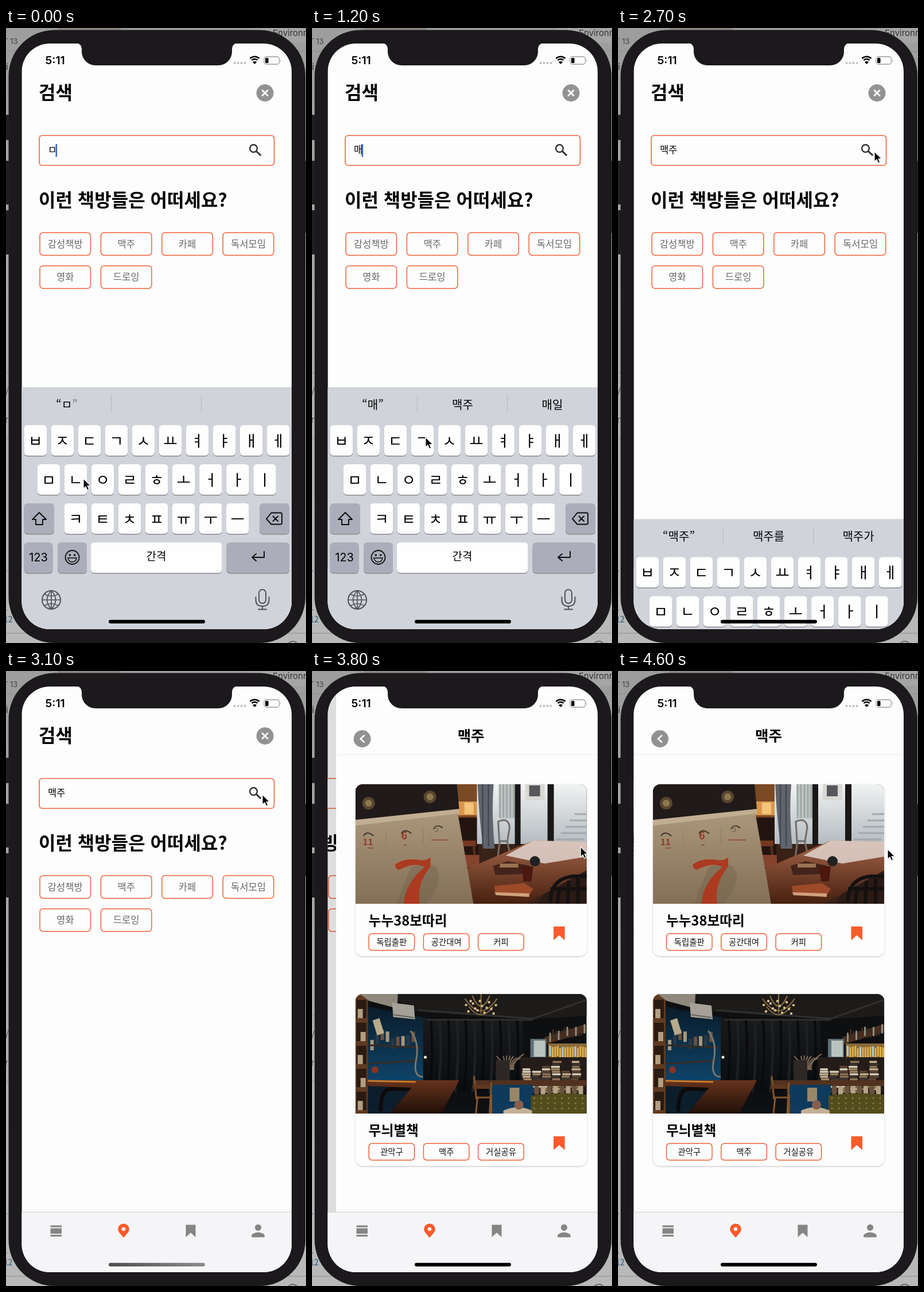
Animation, 523 px wide and 1070 px high, one loop 4700 ms. Source, as an HTML page:

```html
<!DOCTYPE html>
<html lang="ko">
<head>
<meta charset="utf-8">
<style>
html, body { margin: 0; width: 100%; height: 100%; overflow: hidden; background: #bdbdbd; }
svg { display: block; }
#stage { width: 100vw; height: 100vh; }
text { font-family: "Noto Sans CJK KR", "Noto Sans CJK", "Noto Sans KR", sans-serif; white-space: pre; }
.latin { font-family: Inter, Roboto, sans-serif; }
</style>
</head>
<body>
<svg id="stage" viewBox="0 0 523 1070" preserveAspectRatio="none"></svg>
<script>
const LOOP = 4700, STEP = 100;
const ORANGE = '#ee6337', HOT = '#fb5a2b', GREY = '#858585', INK = '#0b0b0c';

let seed = 11;
const rnd = () => (seed = seed * 16807 % 2147483647) / 2147483647;
const times = (n, fn) => Array.from({ length: n }, (_, i) => fn(i)).join('');

const rect = (x, y, w, h, fill, extra = '') =>
  `<rect x="${x}" y="${y}" width="${w}" height="${h}" fill="${fill}" ${extra}/>`;
const path = (d, fill, extra = '') => `<path d="${d}" fill="${fill}" ${extra}/>`;
const line = (d, stroke, width, extra = '') =>
  path(d, 'none', `stroke="${stroke}" stroke-width="${width}" ${extra}`);
const disc = (x, y, r, fill, extra = '') => `<circle cx="${x}" cy="${y}" r="${r}" fill="${fill}" ${extra}/>`;
const text = (s, x, y, size, extra = '') => `<text x="${x}" y="${y}" font-size="${size}" ${extra}>${s}</text>`;
const MID = 'text-anchor="middle"', BOLD = 'font-weight="700"', ROUND = 'stroke-linecap="round" stroke-linejoin="round"';
const group = (id, body, extra = '') => `<g id="${id}" ${extra}>${body}</g>`;
const screenRect = (fill, extra) => rect(27.4, 27, 470.6, 1019, fill, extra);

const chip = (s, x, y, w, h, size, color) =>
  rect(x, y, w, h, 'none', `rx="5.5" stroke="${ORANGE}" stroke-width="1.5"`) +
  text(s, x + w / 2, y + h / 2 + size * .36, size, `${MID} fill="${color}"`);
const bookmark = (x, y, w, h, fill) => path(`M${x} ${y}h${w}v${h}l${-w / 2} ${-h * .36}l${-w / 2} ${h * .36}z`, fill);

function desktop() {
  return rect(0, 0, 523, 1070, 'url(#desk)') +
    rect(90, 0, 110, 4, '#8f8781') + rect(425, 0, 98, 26, '#a5a5a5') +
    text('T 13', -5, 28, 13, 'class="latin" fill="#444"') +
    text('Environr', 465, 14, 15, 'class="latin" fill="#333"') +
    line('M0 40H523M0 600H6M0 714H6M0 1053H60M480 1053H523', '#8d8d8d', 1) +
    text('i', 0, 73, 15, 'class="latin" fill="#333"') +
    rect(0, 151, 8, 44, '#202023') + rect(0, 231, 8, 76, '#202023') + rect(0, 317, 8, 77, '#202023') +
    rect(518, 231, 5, 126, '#2a2a2d') +
    text('/', -1, 638, 15, 'fill="#444"') + text('r', -2, 687, 15, 'fill="#444"') +
    text('1', -5, 945, 14, 'fill="#2a5878"') + text('1', -5, 1013, 14, 'fill="#2a5878"') +
    text('12', -4, 1034, 14, 'fill="#2a5878"') +
    disc(500, 1077, 10, 'none', 'stroke="#555" stroke-width="1.5"');
}

function searchPage() {
  const tags = ['감성책방', '맥주', '카페', '독서모임', '영화', '드로잉'];
  return screenRect('#fefdfe') +
    text('검색', 57, 124, 32, BOLD) +
    disc(451.5, 113, 15, '#929294') +
    line('M447 108.5l9 9m0-9l-9 9', '#fff', 2.8, ROUND) +
    rect(58, 187, 409.5, 52, '#fefdfe', `rx="5" stroke="${ORANGE}" stroke-width="1.6"`) +
    disc(431.5, 209.5, 6.4, 'none', 'stroke="#333538" stroke-width="2.5"') +
    line('M436.3 214.3l8 7.5', '#333538', 3) +
    '<text id="query" x="73" y="218" font-size="16.5"></text>' +
    rect(86.5, 202, 2.6, 22, '#2d6bd0', 'id="caret"') +
    text('이런 책방들은 어떠세요?', 57, 311, 32, BOLD) +
    tags.map((s, i) => chip(s, 59 + i % 4 * 106.4, 356 + (i > 3) * 57.7, 88.5, 39.5, 16.6, '#68686a')).join('');
}

function cafePhoto() {
  return rect(0, 0, 403, 208, '#382116') +
    rect(170, 0, 45, 60, '#7a4a25') + rect(178, 30, 38, 24, '#d9954a') + rect(190, 32, 16, 20, '#f3c47a') +
    rect(170, 58, 45, 70, '#24140f') +
    rect(212, 0, 191, 104, 'url(#window)') +
    rect(250, 0, 28, 60, '#b9c2c0') + times(5, i => line(`M${252 + i * 6} 0v58`, '#8f9694', 1.5)) +
    times(5, i => line(`M${350 + i * 8} ${96 - i * 11}h48`, '#a2a9ae', 3)) +
    path('M213 0h28q-4 50 2 112h-20q-8-60-10-112z', '#5f646d') +
    line('M222 0v108M232 0v108', '#434851', 2.5) +
    line('M249 65q18-8 20 10l-4 24h-14zM252 98l-4 30M264 98l6 24', '#716d69', 3) +
    rect(278, 0, 10, 106, '#1a1717') + rect(335, 0, 11, 106, '#1a1717') +
    rect(296, 0, 34, 28, '#d9d8d4') + rect(303, 2, 19, 19, '#56575b') +
    rect(184, 98, 26, 10, '#75381f') + line('M188 106l-3 44M206 106l5 42', '#56301d', 4) +
    rect(186, 123, 30, 22, '#84432c') +
    path('M192 148L310 98L403 100V152L296 208H208z', 'url(#wood)') +
    path('M310 98L403 100V126L330 138L262 124z', '#e6dcd8', 'opacity=".8"') +
    path('M240 142l26-8 38 8-4 14-56 2z', '#43231a') + rect(252, 138, 32, 7, '#9a7350') +
    path('M290 143h20l-3 26h-14z', '#4a180f') + disc(313, 134, 9, '#212123') +
    path('M242 177l52-5 16 10-8 12-58-4z', '#9c4a29') + path('M243 188l60 2v6l-58-3z', '#cfa27c') +
    path('M330 190L403 150V208H318z', '#2b1a15') +
    line('M340 205q0-42 42-45h21M352 208l4-30M370 208l2-40M388 208v-44M340 182h63', '#151111', 6) +
    path('M0 66L178 48L206 208H0z', 'url(#paper)') +
    path('M0 0H177L181 43L0 62z', '#211a1a') + path('M0 62L181 43v8L0 72z', '#c0ae92') +
    [[23, 33], [130, 22]].map(([x, y]) => disc(x, y, 11, '#58452f') + disc(x, y, 6, '#8d774f')).join('') +
    line('M14 90q6-10 18 0M80 86q6-10 18 0M136 78q6-10 16-2', '#40362e', 2) +
    text('11', 13, 106, 15, 'fill="#91392a" font-weight="700"') +
    text('6', 80, 96, 18, 'fill="#91392a" font-weight="700"') +
    text('5', 137, 83, 15, 'fill="#6f6252" font-weight="500"') +
    line('M22 111h10M84 106h6M132 97h30', '#8d5844', 2) +
    line('M53 80v30M118 75v28', '#8d7d66', 1) +
    path('M96 145q44-18 50 12q2 22-22 51H72z', '#6f5f4c', 'opacity=".4"') +
    path('M69 140q2 11 10 8q24-13 42-4Q88 170 84 208h28Q106 174 131 143L131 127q-8 8-25 4q-24-2-37 9z', '#ab3a20');
}

// uneven piles of books standing on the counter
function bookPiles() {
  const shades = ['#c2b08e', '#8d7355', '#d8cfba', '#5d4435', '#a0865f', '#3c3430'];
  return times(6, col => {
    const x = 290 + col * 17, n = 9 + Math.floor(rnd() * 5);
    return times(n, i => rect(x + rnd() * 3, 168 - i * 4.3, 13 + rnd() * 3, 3.5, shades[Math.floor(rnd() * 6)]));
  });
}

function loungePhoto() {
  const bottles = times(15, i => rect(338 + i * 4.4, 90 + rnd() * 5, 3, 18, i % 5 ? '#e0b04a' : '#a9cfe0'));
  return rect(0, 0, 403, 208, '#0e0f11') +
    path('M60 0H403V38L300 44L100 30z', '#1d1b19') +
    path('M22 22L125 42V155H22z', 'url(#wall)') +
    rect(0, 0, 22, 208, '#5f3a20') +
    times(5, i => rect(2, 10 + i * 40, 17, 32, '#2a1b12') + rect(4 + i % 2 * 5, 26 + i * 40, 9, 16, '#b39d80')) +
    path('M8 0H74L73 25L24 12z', '#8f887c') +
    path('M64 15l38 5 2 24-38-4z', '#a5a198') + line('M67 36l35 5', '#66625b', 2) +
    rect(118, 43, 174, 128, 'url(#drape)') + line('M110 28L310 43L403 10M125 45H310', '#302f2e', 3) +
    times(11, i => line(`M${132 + i * 15} 46q5 60-3 125`, i % 2 ? '#1f2023' : '#090a0c', 4)) +
    times(9, i => rect(26 + i * 9, 60 + rnd() * 24, 6, 18, ['#a8977a', '#283a48', '#6e5038'][i % 3])) +
    path('M30 46l12-4 8 26-12 4z', '#b9a98b') +
    line('M22 89l92 4M24 121l86-5', '#372c24', 3) + line('M96 64q16 20 10 50t12 30', '#77776f', 3) +
    disc(122, 110, 2.5, '#fff6d5') + disc(34, 132, 6, '#8b3423') +
    line('M219 0v33M191 8q28 42 56 0M198 22q21 28 42 0M204 3q15 36 30 0', '#8a7046', 2) +
    times(14, i => disc(193 + i * 4, 12 + rnd() * 23, 2.2, '#d8bd84')) +
    path('M330 75L403 52V66L330 88z', '#4c301c') + rect(305, 78, 28, 33, '#5f7078') + rect(311, 81, 20, 28, '#b9c4c0') +
    rect(336, 86, 67, 26, '#8a6a38') + bottles +
    times(13, i => rect(338 + i * 5, 62 + rnd() * 6 - i, 3, 16, i % 3 ? '#3f2b21' : '#8b8d86')) +
    rect(288, 110, 115, 62, '#241c18') + bookPiles() +
    times(9, i => line(`M${260 + i * 2} 132q-4-14 ${-14 + i * 4}-${18 + rnd() * 12}`, '#7d6a56', 2)) +
    rect(245, 115, 24, 35, '#2d2825') +
    path('M207 150H403V160H207z', '#51311f') + rect(235, 158, 75, 50, '#0e3b5c') +
    times(8, i => rect(312 + i * 11, 160, 8, 15, i % 2 ? '#b5a383' : '#6c5340')) +
    rect(269, 163, 17, 24, '#9a8767') +
    line('M207 143l4 40m26-29l-3 54M212 180h24M210 208l3-28M237 175v33', '#865529', 3) + rect(205, 158, 30, 7, '#5f381f') +
    rect(22, 158, 80, 50, '#0c1d2b') + line('M44 205q0-40 18-40h30q12 0 13 40', '#0e0a09', 7) +
    path('M22 150H181L150 208H60L98 163L22 160z', 'url(#bar)') + line('M22 151L105 153', '#c87a2b', 3) +
    path('M306 177q48-8 97-2v33h-97z', '#534c1d') +
    times(24, i => disc(312 + i % 8 * 12, 181 + Math.floor(i / 8) * 9, 1.5, '#8d8138')) +
    path('M258 203q25-12 50 0v5h-50z', '#c4b096') + disc(285, 193, 8, '#86604c');
}

function card(y, photo, name, tags) {
  return `<g transform="translate(61 ${y})">` +
    rect(0, 0, 403.5, 299, '#fefdfe', 'rx="13" filter="url(#soft)"') +
    `<g clip-path="url(#cardTop)"><svg width="403.5" height="208" overflow="hidden">${photo}</svg></g>` +
    text(name, 23, 246, 23.7, BOLD) +
    tags.map((s, i) => chip(s, 23.5 + i * 95.3, 260, 79.5, 29, 14.4, '#111')).join('') +
    bookmark(345.5, 247.5, 19.5, 24, HOT) + '</g>';
}

function resultPage() {
  return screenRect('#fefdfe') + rect(28, 145, 470, 1, '#ebebed') +
    disc(73, 118, 15, '#929294') + line('M76 112.5l-6 5.5 6 5.5', '#fff', 2.6, ROUND) +
    text('맥주', 262.5, 121.5, 25.5, `${MID} ${BOLD}`) +
    card(197, cafePhoto(), '누누38보따리', ['독립출판', '공간대여', '커피']) +
    card(562, loungePhoto(), '무늬별책', ['관악구', '맥주', '거실공유']);
}

function tabBar() {
  return rect(27, 941, 472, 105, '#f5f5f7') + rect(27, 941, 472, 1, '#cfcfd2') +
    rect(77.5, 964.5, 19.5, 3.2, GREY) + rect(77.5, 969.5, 19.5, 9.5, GREY) + rect(77.5, 980.8, 19.5, 3.2, GREY) +
    path('M205 986C198 978 195.2 975 195.2 971a9.8 9.4 0 0 1 19.6 0C214.8 975 212 978 205 986z', HOT) +
    disc(205, 971, 3.3, '#f5f5f7') +
    bookmark(313.5, 963.5, 17, 21.5, GREY) +
    disc(439.5, 968.3, 5.6, GREY) + path('M428.2 985.300v-2.800c0-3.800 7.500-5.700 11.300-5.700s11.300 1.900 11.300 5.700v2.800z', GREY);
}

const PITCH = 47.06, KEY_W = 39.5, KEY_H = 53;
const rows = [['ㅂㅈㄷㄱㅅㅛㅕㅑㅐㅔ', 51.2, 691], ['ㅁㄴㅇㄹㅎㅗㅓㅏㅣ', 74.5, 759], ['ㅋㅌㅊㅍㅠㅜㅡ', 121.4, 827]];
const keys = {};
for (const [chars, x, y] of rows) [...chars].forEach((c, i) => keys[c] = [x + i * PITCH, y]);

const keyCap = (x, y, w, fill) => rect(x, y + 1.5, w, KEY_H, '#898b91', 'rx="6"') + rect(x, y, w, KEY_H, fill, 'rx="6"');

function keyboard() {
  const dark = '#abaeba';
  return rect(27, 625, 472, 421, '#d0d3da') +
    line('M183.5 638v31M340.5 638v31', '#b4b7be', 1) +
    [106, 262.5, 419].map((x, i) => text('', x, 663, 20, `${MID} id="hint${i}"`)).join('') +
    Object.entries(keys).map(([c, [x, y]]) => keyCap(x - KEY_W / 2, y, KEY_W, '#fefefe') +
      text(c, x, y + 36.5, 26.5, MID)).join('') +
    keyCap(31.5, 827, 52.5, dark) + keyCap(442, 827, 52, dark) + keyCap(31.5, 895, 50, dark) +
    keyCap(90, 895, 51, dark) + keyCap(148, 895, 228.5, '#fefefe') + keyCap(384.5, 895, 109.5, dark) +
    line('M58 843l-12 12h6v9h12v-9h6z', INK, 1.9, ROUND) +
    line('M454 854l8.5-10.5h16q2.5 0 2.5 2.5v15q0 2.5-2.5 2.5h-16zM465.5 849.5l8.5 8.5m0-8.5l-8.5 8.5', INK, 1.9, ROUND) +
    text('123', 56.5, 928, 20, `${MID} class="latin"`) + text('간격', 262, 926, 19, MID) +
    disc(115.5, 921, 12, 'none', `stroke="${INK}" stroke-width="1.8"`) +
    disc(111.3, 917, 1.8, INK) + disc(119.7, 917, 1.8, INK) +
    line('M108 922h15q-1 7-7.5 7t-7.5-7z', INK, 1.6) +
    line('M450 911v10h-20m6-6l-7 6 7 6', INK, 2, ROUND) +
    disc(79, 995, 16, 'none', 'stroke="#505357" stroke-width="2"') +
    line('M79 979v32M63 995h32M79 979q-15 16 0 32M79 979q15 16 0 32M67 985q12 7 24 0M67 1005q12-7 24 0', '#505357', 1.7) +
    rect(441, 977, 12, 24, 'none', 'rx="6" stroke="#505357" stroke-width="2"') +
    line('M435.5 990v5q0 11 11.5 11t11.5-11v-5M447 1006v5M440 1011.5h14', '#505357', 2, ROUND) +
    group('popup', path('M-27-66H27Q37-66 37-56V-22Q37-12 28-5Q20 1 20 10V47Q20 53 14 53H-14Q-20 53-20 47V10Q-20 1-28-5Q-37-12-37-22V-56Q-37-66-27-66z', '#fefefe', 'filter="url(#soft)"') +
      text('', 0, -22, 40, `${MID} id="popChar"`));
}

function statusBar() {
  const arc = r => `M${433.5 - r} ${61 - r}a${r * 1.42} ${r * 1.42} 0 0 1 ${2 * r} 0`;
  return text('5:11', 68.5, 63, 19.3, 'class="latin" font-weight="600"') +
    times(4, i => disc(398.5 + i * 6, 61, 2, '#bfbfc1')) +
    line(arc(8) + arc(5), '#000', 2.6) + path('M433.5 63l-3.6-3.8a5 5 0 0 1 7.2 0z', '#000') +
    rect(450, 50, 26.5, 13, 'none', 'rx="4" stroke="#9b9b9d" stroke-width="1.3"') +
    rect(452, 52, 5.5, 9, '#000', 'rx="1.5"') + path('M478.5 54.5q2 2 0 4.5z', '#9b9b9d');
}

const shell = rect(4.5, 3.5, 517.5, 1066.5, '#1b191c', 'rx="80"');
const notch = path('M122 26a10 10 0 0 1 10 10v5a24 24 0 0 0 24 24h214a24 24 0 0 0 24-24v-5a10 10 0 0 1 10-10z', '#1b191c');
const arrow = path('M0 0V17.5L4 13.8L6.7 20L9.7 18.7L7.1 12.6H12.5z', '#000', 'stroke="#fff" stroke-width="1.2"');
const grad = (id, a, b, dir = 'x2="0" y2="1"') =>
  `<linearGradient id="${id}" ${dir}><stop stop-color="${a}"/><stop offset="1" stop-color="${b}"/></linearGradient>`;

const stage = document.getElementById('stage');
stage.innerHTML = '<defs>' +
  grad('desk', '#9d9d9d', '#b9b9b9') + grad('window', '#f1f3f3', '#b4bbbf') + grad('wood', '#a4644a', '#47200f') +
  grad('paper', '#ab977b', '#836f56') + grad('drape', '#191a1c', '#0b0c0e') + grad('bar', '#66331c', '#200f09') +
  grad('wall', '#0a1c2a', '#0e456b') + grad('fade', '#4e4e50', '#8c8c8f', '') +
  `<clipPath id="screen">${screenRect('#000', 'rx="49"')}</clipPath>` +
  `<clipPath id="cardTop">${rect(0, 0, 403.5, 230, '#000', 'rx="13"')}</clipPath>` +
  '<filter id="soft" x="-10%" y="-10%" width="120%" height="120%"><feDropShadow dx="0" dy="1" stdDeviation="1.8" flood-opacity=".24"/></filter></defs>' +
  desktop() + shell +
  '<g clip-path="url(#screen)">' +
  group('search', searchPage()) + screenRect('#000', 'id="dim"') +
  group('result', resultPage()) + tabBar() + group('keyboard', keyboard()) +
  rect(179, 1029.7, 168, 6.3, '#000', 'id="home" rx="3.15"') + statusBar() + '</g>' +
  notch + group('cursor', arrow);

const $ = id => document.getElementById(id);
const show = (id, on) => $(id).setAttribute('visibility', on ? 'visible' : 'hidden');
const move = (id, x, y) => $(id).setAttribute('transform', `translate(${x} ${y})`);

// time, query, caret x, suggestions
const typing = [
  [0, 'ㅁ', 86.5, '', ''],
  [700, '매', 86.5, '맥주', '매일'],
  [1400, '맥', 87, '맥주', '맥락'],
  [1800, '맥ㅈ', 102, '맥주', '맥주를'],
  [2400, '맥주', 102, '맥주를', '맥주가']
];
const presses = [[600, 'ㅐ'], [1300, 'ㄱ'], [1700, 'ㅈ'], [2300, 'ㅜ']];
const pointer = [
  [0, 135, 784], [550, 430, 714], [750, 430, 714], [1150, 198, 712], [1400, 198, 712],
  [1650, 102, 714], [1800, 102, 714], [2150, 354, 841], [2350, 354, 841], [2600, 447, 215],
  [3450, 447, 215], [3600, 466, 294], [3900, 469, 310], [4300, 470, 310], [LOOP, 470, 310]
];

function pointerAt(t) {
  const i = pointer.findIndex(p => p[0] > t);
  const [t0, x0, y0] = pointer[i - 1], [t1, x1, y1] = pointer[i];
  const u = (t - t0) / (t1 - t0), e = u * u * (3 - 2 * u);
  return [x0 + (x1 - x0) * e, y0 + (y1 - y0) * e];
}

// critically damped spring from 0 to 1
function spring(ms) {
  const k = Math.max(0, ms) * .01826;
  return 1 - (1 + k) * Math.exp(-k);
}

function draw(t) {
  const [, query, caretX, second, third] = typing.filter(s => s[0] <= t).pop();
  $('query').textContent = query;
  $('caret').setAttribute('x', caretX);
  show('caret', t < 2600 && !(t >= 300 && t < 600));
  $('hint0').innerHTML = `“${query}<tspan fill="${t < STEP ? '#777' : '#000'}">”</tspan>`;
  $('hint1').textContent = second;
  $('hint2').textContent = third;

  const press = presses.find(p => t >= p[0] && t < p[0] + STEP);
  show('popup', press);
  if (press) {
    move('popup', ...keys[press[1]]);
    $('popChar').textContent = press[1];
  }

  move('keyboard', 0, t < 3100 ? 421 * spring(t - 2600) : 430);
  $('home').setAttribute('fill', t >= 2900 && t < 3300 ? 'url(#fade)' : '#000');

  const p = spring(t - 3509);
  move('search', -141 * p, 0);
  $('dim').setAttribute('opacity', .13 * p);
  move('result', 470 * (1 - p), 0);
  show('result', p > 0);
  move('cursor', ...pointerAt(t));
}

const start = performance.now();
function tick() {
  const t = (performance.now() - start) % LOOP;
  draw(Math.floor(t / STEP) * STEP);
  requestAnimationFrame(tick);
}
tick();
</script>
</body>
</html>
```
